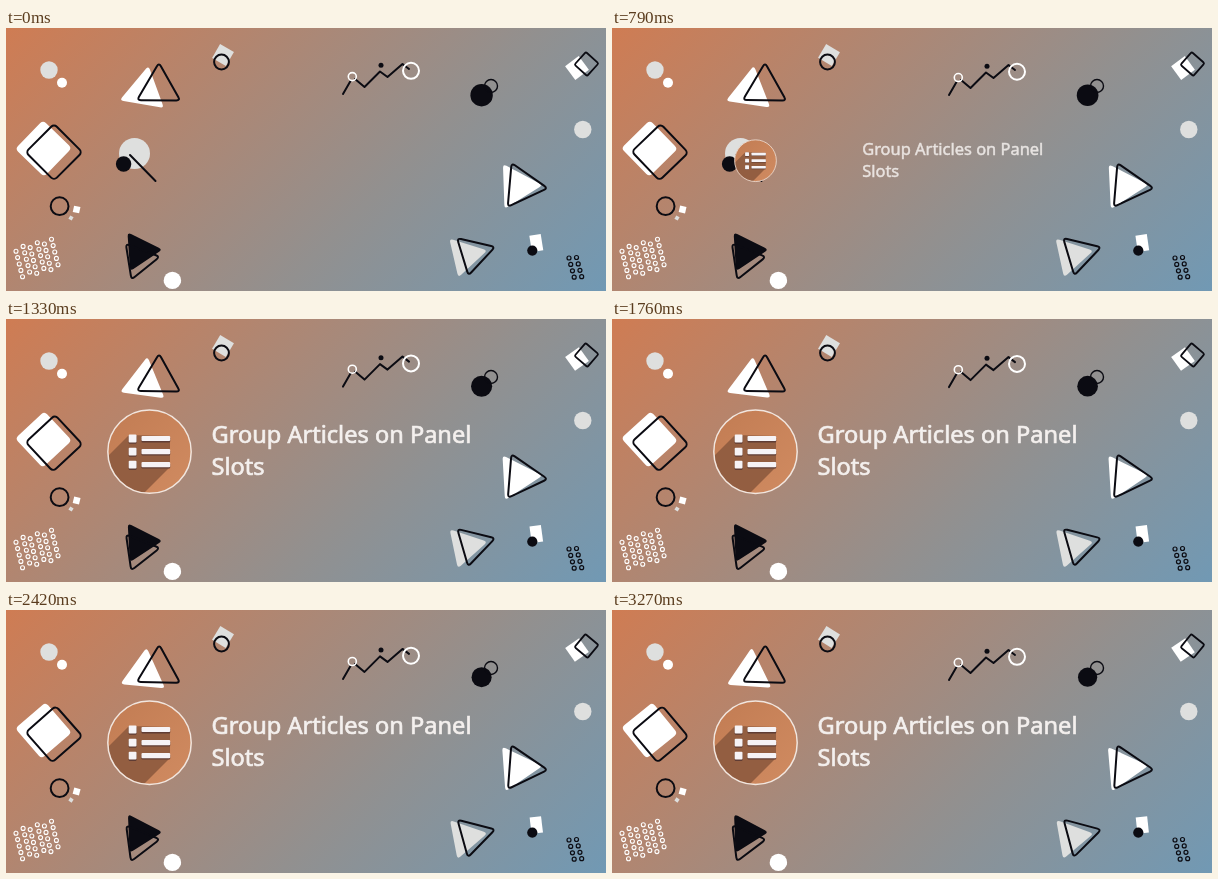
An HTML page that plays this animation: 600x263 px, repeating every 3300 ms.

```html
<!DOCTYPE html>
<html lang="en">
<head>
<meta charset="utf-8">
<title>Banner</title>
<style>
  html, body { margin: 0; width: 100%; height: 100%; overflow: hidden; }
  body { background: linear-gradient(135deg, #cf7c53, #92908f 62%, #7199b4); }
  svg { display: block; width: 100vw; height: 100vh; }
  text {
    font: 400 23.6px "Noto Sans", "Open Sans", sans-serif;
    fill: #f4f0ee; stroke: #f4f0ee; stroke-width: .7px;
  }
</style>
</head>
<body>
<svg viewBox="0 0 600 263">
  <defs>
    <clipPath id="disc"><circle cx="143.5" cy="132.7" r="41.5"/></clipPath>
    <linearGradient id="copper" x1="0" y1="0" x2="1" y2="1">
      <stop offset="0" stop-color="#c27c53"/>
      <stop offset="1" stop-color="#d08b61"/>
    </linearGradient>
  </defs>
  <g id="shapes" stroke-linejoin="round" stroke-linecap="round"></g>
  <g id="icon">
    <circle cx="143.5" cy="132.7" r="42" fill="url(#copper)"/>
    <path d="M123 116L164 117V148L130 182L80 159Z" fill="#935e41" clip-path="url(#disc)"/>
    <g id="rows"></g>
    <circle cx="143.5" cy="132.7" r="41.7" fill="none" stroke="#f1e6df" stroke-width="1.5"/>
  </g>
  <g id="title">
    <text x="205.5" y="124.3">Group Articles on Panel</text>
    <text x="205.5" y="156.3">Slots</text>
  </g>
</svg>
<script>
const LOOP = 3300, STEP = 30;
const INK = '#0b0b12', WHITE = '#fff', PALE = '#dedfde';
const byId = id => document.getElementById(id);
const shapes = byId('shapes'), icon = byId('icon'), title = byId('title');
const movers = [];

function add(tag, attrs, parent = shapes) {
  const el = document.createElementNS('http://www.w3.org/2000/svg', tag);
  for (const k in attrs) el.setAttribute(k, attrs[k]);
  parent.append(el);
  return el;
}

const solid = color => ({ fill: color });
const line = (color, width = 2) => ({ fill: 'none', stroke: color, 'stroke-width': width });

function dot(cx, cy, r, paint, parent) {
  return add('circle', { cx, cy, r, ...paint }, parent);
}

// Places a shape drawn around the origin and turns it slowly over the loop
function spin(el, x, y, angle, turn) {
  movers.push(p => el.setAttribute('transform', `translate(${x} ${y}) rotate(${angle + turn * p})`));
}

function box(x, y, size, angle, turn, paint, rx = 0, height = size) {
  const el = add('rect', { x: -size / 2, y: -height / 2, width: size, height, rx, ...paint });
  spin(el, x, y, angle, turn);
}

// Equilateral triangle with rounded corners; one corner points along the angle
function triangle(x, y, r, angle, turn, paint) {
  const corner = k => [r * Math.cos(k * Math.PI * 2 / 3), r * Math.sin(k * Math.PI * 2 / 3)];
  const toward = (a, b) => a.map((v, i) => v + (b[i] - v) * 4 / (r * Math.sqrt(3)));
  let d = '';
  for (let k = 0; k < 3; k++) {
    const c = corner(k);
    d += `${k ? 'L' : 'M'}${toward(c, corner(k - 1))}Q${c} ${toward(c, corner(k + 1))}`;
  }
  spin(add('path', { d: d + 'Z', ...paint }), x, y, angle, turn);
}

// Slanted grid of small rings; odd columns may be lifted
function rings(x, y, cols, rows, dx, dy, lift, paint) {
  for (let c = 0; c < cols; c++)
    for (let r = 0; r < rows; r++)
      dot(x + dx * c + dx * 0.23 * r, y + dy * c - lift * (c % 2) + 6.4 * r, 2, paint);
}

dot(43, 42, 8.7, solid(PALE));
dot(56, 54.7, 5, solid(WHITE));

box(217, 27, 16, 30, 2, solid(PALE));
dot(215.5, 34, 7.4, line(INK));

triangle(138, 63.3, 26, -80, -6, solid(WHITE));
triangle(152.7, 59.8, 25, -89.5, 1, line(INK));

box(37.5, 120.5, 40, 44, 7, solid(WHITE), 4);
box(48, 124.2, 40, 45, 5, line(INK), 4);

dot(128.5, 125.5, 15.5, solid(PALE));
dot(117.6, 136, 7.7, solid(INK));
add('path', { d: 'M124 127l25.5 26', ...line(INK) });

dot(53.6, 178.2, 8.9, line(INK));
box(70.6, 181.5, 6.5, 12, 4, solid(WHITE));
box(65, 190, 3.8, 30, 4, solid(PALE));

triangle(134, 223, 22.5, -4, 2, solid(INK));
triangle(133, 232, 21, -9, 2, line(INK));
dot(166.4, 252.4, 8.7, solid(WHITE));

const chart = add('g', {});
add('path', { d: 'M337 66L344.5 53M349 51L358.5 59L374 43.5L381.5 49L396.5 36L403 41', ...line(INK) }, chart);
dot(346.3, 48.6, 4, line(WHITE, 1.6), chart);
dot(405, 42.8, 8, line(WHITE), chart);
dot(375, 37.2, 2.5, solid(INK), chart);
movers.push(p => chart.setAttribute('transform', `translate(0 ${4 * p})`));

const ball = dot(475.6, 67.2, 11.2, solid(INK));
movers.push(p => ball.setAttribute('r', 11.2 - 1.6 * p));
dot(485, 58, 6.5, line(INK, 1.4));

box(571, 40, 17, -37, 3, solid(WHITE));
box(580.5, 36, 17, 42, -3, line(INK, 1.8), 1.5);
dot(576.8, 101.5, 8.7, solid(PALE));

triangle(510.7, 158, 26, -2, -3, solid(WHITE));
triangle(516.3, 158, 25.4, 5, -1, line(INK));

triangle(459, 227.5, 23, 107, 3, solid(PALE));
triangle(467.5, 225.5, 22.5, 103, 2, line(INK));

box(530.3, 215, 11.5, -9, 3, solid(WHITE), 0, 16.5);
dot(526.3, 222.6, 5.1, solid(INK));

rings(10, 223.2, 6, 5, 7.1, -1.8, 3, line(WHITE, 1.1));
rings(563, 230, 2, 4, 7.5, -0.5, 0, line(INK, 1.2));

// List glyph: each row has a dark underside
const rows = byId('rows');
for (let i = -1; i <= 1; i++)
  for (const [drop, fill] of [[1.3, '#5f3c34'], [0, '#f6f3f6']]) {
    const y = 132.6 + 13.1 * i + drop;
    add('rect', { x: 122.7, y: y - 3.9, width: 7.8, height: 7.8, rx: 1, fill }, rows);
    add('rect', { x: 135.5, y: y - 2.6, width: 28.7, height: 5.2, rx: 1, fill }, rows);
  }

// Quadratic ease-out between two times
function grow(t, start, end) {
  const u = Math.min(1, Math.max(0, (t - start) / (end - start)));
  return 1 - (1 - u) ** 2;
}

function zoom(el, x, y, s) {
  el.setAttribute('transform', `translate(${x} ${y}) scale(${s}) translate(${-x} ${-y})`);
  el.setAttribute('visibility', s > 0 ? 'visible' : 'hidden');
}

function draw(now) {
  const t = Math.floor((now % LOOP) / STEP) * STEP;
  for (const move of movers) move(t / LOOP);
  const s = grow(t, 335, 1325);
  zoom(title, 353, 132, s);
  title.setAttribute('opacity', Math.min(1, s * 1.25));
  zoom(icon, 143.5, 132.7, grow(t, 548, 1340));
}

const start = performance.now();
function tick() {
  draw(performance.now() - start);
  requestAnimationFrame(tick);
}
tick();
</script>
</body>
</html>
```
